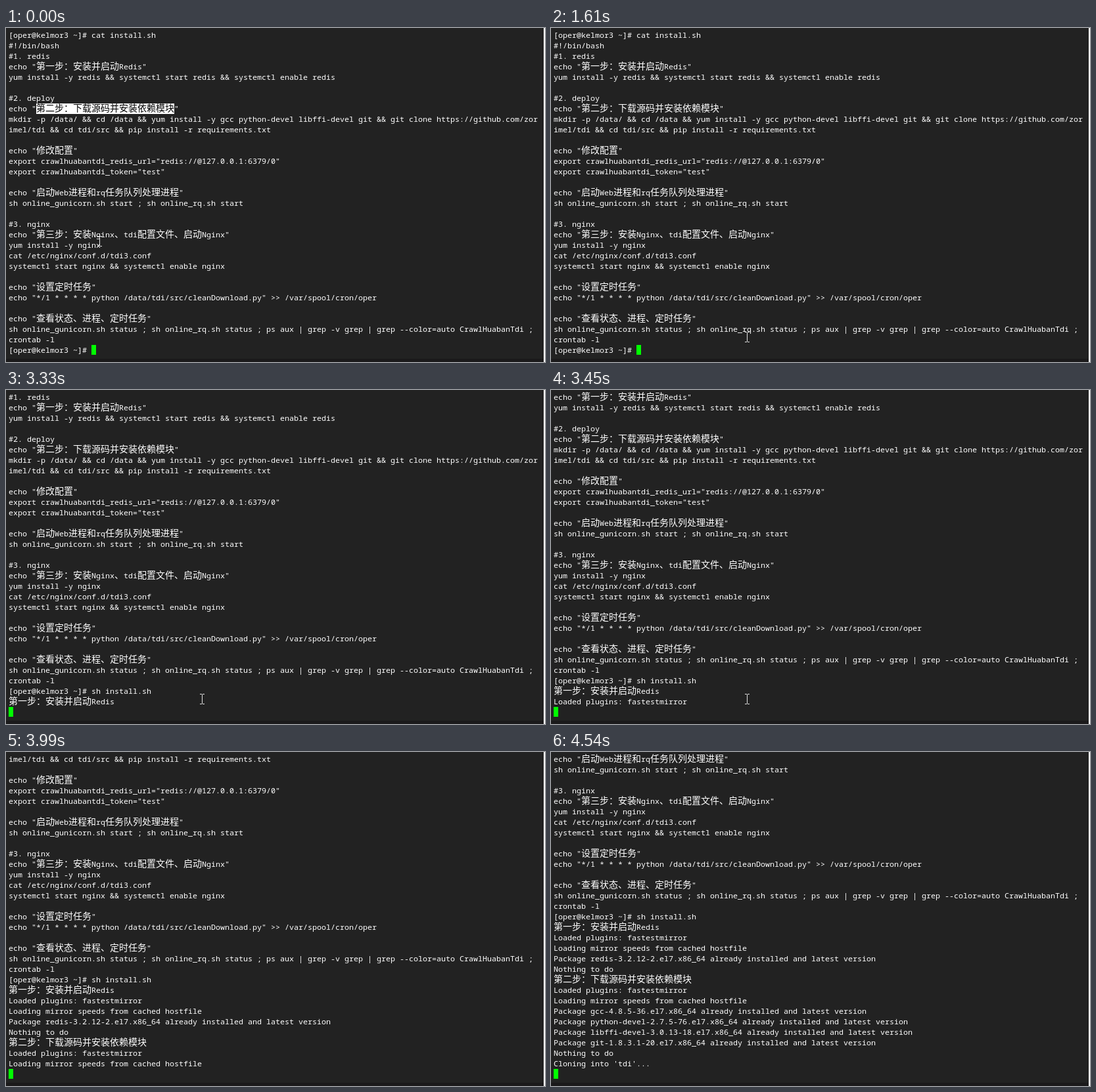
Recreate the animation shown at these times as an HTML page with a canvas. Size 820 by 509 pixels, loop 8000 ms.

```html
<!DOCTYPE html>
<html lang="zh">
<head>
<meta charset="utf-8">
<title>Terminal</title>
<style>
html, body { margin: 0; width: 100%; height: 100%; overflow: hidden; background: #222; }
canvas { display: block; }
</style>
</head>
<body>
<canvas id="stage" width="820" height="509"></canvas>
<script>
const ctx = document.getElementById('stage').getContext('2d');
const LOOP = 8000, TICK = 135;
const ROWS = 31, CELL = 7, LINE = 16, LEFT = 4, TOP = 3;
const LATIN = '500 11.67px "Noto Sans Mono", "DejaVu Sans Mono", monospace';
const HAN = '300 14px "Noto Sans CJK SC", "Noto Sans CJK", sans-serif';
const PROMPT = '[oper@kelmor3 ~]# ';

const script = `${PROMPT}cat install.sh
#!/bin/bash
#1. redis
echo "第一步：安装并启动Redis"
yum install -y redis && systemctl start redis && systemctl enable redis

#2. deploy
echo "第二步：下载源码并安装依赖模块"
mkdir -p /data/ && cd /data && yum install -y gcc python-devel libffi-devel git && git clone https://github.com/zor
imel/tdi && cd tdi/src && pip install -r requirements.txt

echo "修改配置"
export crawlhuabantdi_redis_url="redis://@127.0.0.1:6379/0"
export crawlhuabantdi_token="test"

echo "启动Web进程和rq任务队列处理进程"
sh online_gunicorn.sh start ; sh online_rq.sh start

#3. nginx
echo "第三步：安装Nginx、tdi配置文件、启动Nginx"
yum install -y nginx
cat /etc/nginx/conf.d/tdi3.conf
systemctl start nginx && systemctl enable nginx

echo "设置定时任务"
echo "*/1 * * * * python /data/tdi/src/cleanDownload.py" >> /var/spool/cron/oper

echo "查看状态、进程、定时任务"
sh online_gunicorn.sh status ; sh online_rq.sh status ; ps aux | grep -v grep | grep --color=auto CrawlHuabanTdi ;
crontab -l`.split('\n');

// One entry arrives per tick.
const keys = ['sh', ' ', 'i', 'nstall.sh '];
const plugins = 'Loaded plugins: fastestmirror';
const mirrors = 'Loading mirror speeds from cached hostfile';
const installed = name => `Package ${name}.el7.x86_64 already installed and latest version`;
const batches = [
  ['第一步：安装并启动Redis'],
  [plugins],
  [mirrors],
  [installed('redis-3.2.12-2'), 'Nothing to do'],
  ['第二步：下载源码并安装依赖模块'],
  [plugins, mirrors],
  [installed('gcc-4.8.5-36'), installed('python-devel-2.7.5-76')],
  [installed('libffi-devel-3.0.13-18'), installed('git-1.8.3.1-20'), 'Nothing to do'],
  [],
  ["Cloning into 'tdi'..."]
];

const clamp = (v, max) => Math.max(0, Math.min(max, v));
const ticks = (t, start, length = TICK) => Math.floor((t - start) / length);
const arrived = (list, t, start, length) => list.slice(0, clamp(ticks(t, start, length) + 1, list.length));

function rect(color, x, y, w, h) {
  ctx.fillStyle = color;
  ctx.fillRect(x, y, w, h);
}

function drawLine(text, row, selected) {
  const y = TOP + row * LINE;
  const first = text.indexOf('"'), last = text.lastIndexOf('"');
  let x = LEFT;
  [...text].forEach((ch, i) => {
    const wide = ch > '\u2fff';
    const width = wide ? CELL * 2 : CELL;
    const marked = selected && i > first && i < last;
    if (marked) rect('#fff', x, y, width, LINE);
    ctx.fillStyle = marked ? '#000' : '#fff';
    ctx.font = wide ? HAN : LATIN;
    ctx.fillText(ch, x, y + 12);
    x += width;
  });
  return x;
}

function selectedStep(t) {
  if (t < 360) return 'echo "第二步';
  return t >= 510 && t < 1610 ? 'echo "第三步' : null;
}

// The pointer rises a little, then glides down to the command with an ease-out.
function drawPointer(t) {
  if (t >= 3870) return;
  const rise = clamp(ticks(t, 0, 120), 2) * 6;
  const glide = 1 - (1 - clamp(ticks(t, 630), 5) / 5) ** 2;
  const nudge = t >= 3600 ? 4 : 0;
  const x = Math.round(138 + 156 * Math.min(1, glide * 1.6)) - nudge;
  const y = Math.round(317 - rise + 158 * glide);
  const ink = '#e4e4e4';
  for (const edge of [y, y + 15]) {
    rect(ink, x + 1, edge, 3, 1);
    rect(ink, x + 5, edge, 3, 1);
  }
  rect(ink, x + 4, y + 1, 1, 14);
}

function render(t) {
  rect('#222', 0, 0, 820, 509);
  rect('#1b1a1b', 0, 504, 818, 5);
  rect('#fff', 818, 0, 2, 509);

  const output = arrived(batches, t, 3315).flat();
  const lines = [...script, PROMPT + arrived(keys, t, 2180, 140).join(''), ...output];
  if (output.length) lines.push('');
  const step = selectedStep(t);
  let end = LEFT;
  lines.slice(-ROWS).forEach((text, row) => {
    end = drawLine(text, row, step && text.startsWith(step));
  });
  rect('#0f0', end, TOP + (ROWS - 1) * LINE, CELL, 15);
  drawPointer(t);
}

let origin;
function frame(now) {
  origin ??= now;
  render((now - origin) % LOOP);
  requestAnimationFrame(frame);
}
render(0);
requestAnimationFrame(frame);
</script>
</body>
</html>
```
